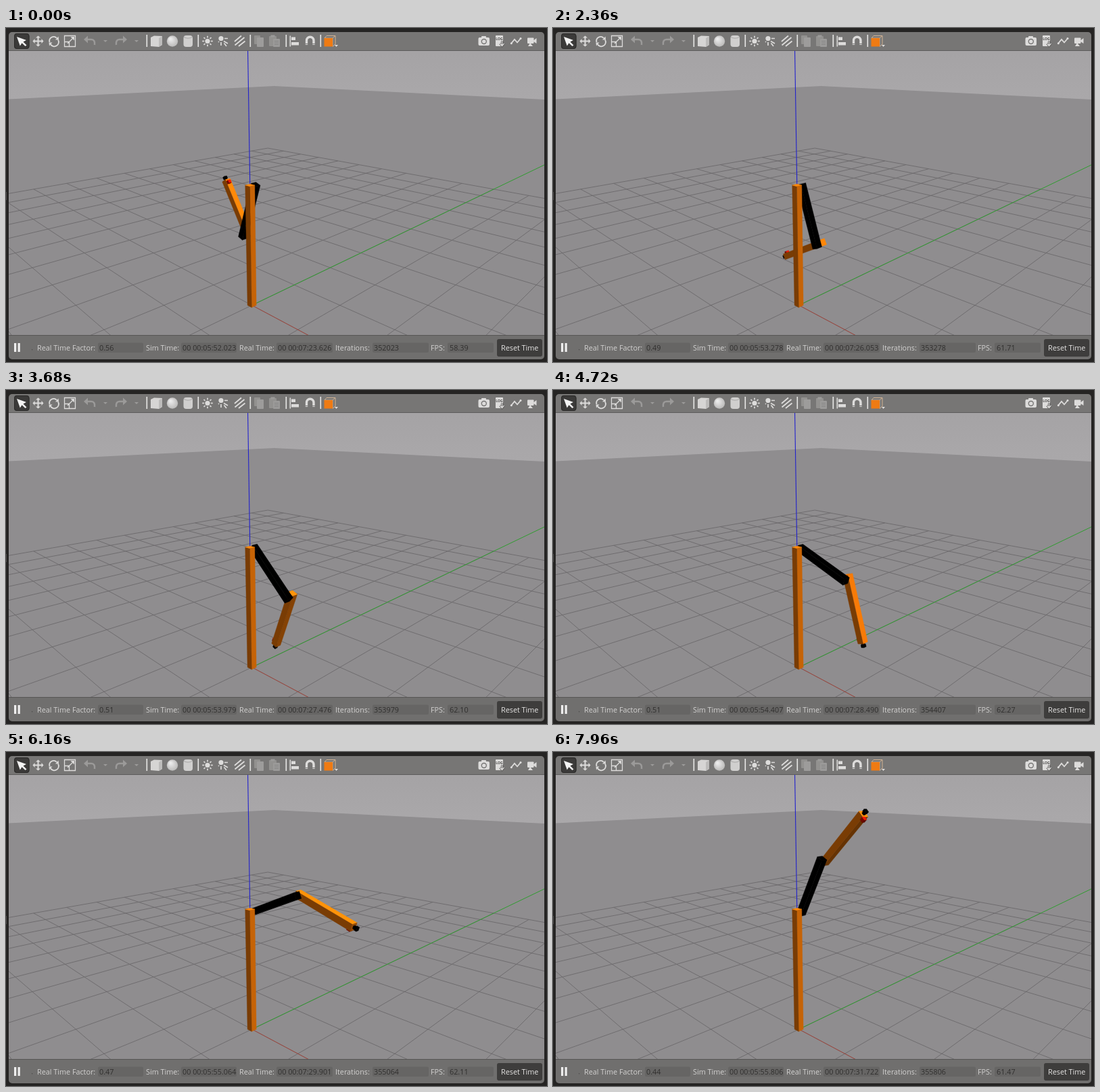
Animation of 800 by 495 pixels, one loop 8 s. Source, as an HTML page with a canvas:

```html
<!DOCTYPE html>
<html lang="en">
<head>
<meta charset="utf-8">
<title>Robot arm simulation</title>
<style>
html, body { margin: 0; width: 100%; height: 100%; overflow: hidden; background: #252423; }
canvas { display: block; width: 800px; height: 495px; }
</style>
</head>
<body>
<canvas id="stage" width="800" height="495"></canvas>
<script>
const LOOP = 8000;
const canvas = document.getElementById('stage');
const backdrop = document.createElement('canvas');
backdrop.width = 800;
backdrop.height = 495;
let g = backdrop.getContext('2d');

// ---- drawing helpers ----
function rect(x, y, w, h, color, r = 0) {
  g.fillStyle = color;
  g.beginPath();
  g.roundRect(x, y, w, h, r);
  g.fill();
}
function disc(x, y, r, color) {
  g.fillStyle = color;
  g.beginPath();
  g.arc(x, y, r, 0, 7);
  g.fill();
}
function poly(points, color) {
  g.fillStyle = color;
  g.beginPath();
  points.forEach(p => g.lineTo(p[0], p[1]));
  g.closePath();
  g.fill();
}
function stroke(path, color, width = 1) {
  g.strokeStyle = color;
  g.lineWidth = width;
  g.stroke(new Path2D(path));
}
function text(s, x, color) {
  g.font = '10.8px "Open Sans", sans-serif';
  g.fillStyle = color;
  g.fillText(s, x, 477.7);
}

// ---- camera: z up, looking along (-x, +y) and slightly down ----
const FOCAL = 686, DIST = 6.679, SIDE = 0.395, HEIGHT = 3.768, PITCH = 0.275643;
const EYE = [(SIDE + DIST) / Math.SQRT2, (SIDE - DIST) / Math.SQRT2, HEIGHT];
const COS = Math.cos(PITCH), SIN = Math.sin(PITCH);

function toView([x, y, z]) {
  const u = (y - x) / Math.SQRT2 + DIST, v = z - HEIGHT;
  return [(x + y) / Math.SQRT2 - SIDE, u * SIN + v * COS, u * COS - v * SIN];
}
const toScreen = ([r, up, depth]) => [400 + FOCAL * r / depth, 244.5 - FOCAL * up / depth];
const project = p => toScreen(toView(p));

function line3(a, b, color, width = 1) {
  let p = toView(a), q = toView(b);
  const near = 0.2;
  if (p[2] < near && q[2] < near) return;
  if (p[2] > q[2]) [p, q] = [q, p];
  if (p[2] < near) {
    const k = (near - p[2]) / (q[2] - p[2]);
    p = p.map((c, i) => c + (q[i] - c) * k);
  }
  const [x1, y1] = toScreen(p), [x2, y2] = toScreen(q);
  stroke(`M${x1} ${y1}L${x2} ${y2}`, color, width);
}

// ---- lit boxes, turned about the y axis ----
const LIGHT = [0.485, -0.097, 0.873];
const ORANGE = [255, 127, 8], BLACK = [0, 0, 0], RED = [235, 22, 5];
const dot = (a, b) => a[0] * b[0] + a[1] * b[1] + a[2] * b[2];

function makeFrame(origin, degrees) {
  const s = Math.sin(degrees * Math.PI / 180), c = Math.cos(degrees * Math.PI / 180);
  const turn = ([x, y, z]) => [x * c + z * s, y, z * c - x * s];
  return { turn, place: p => turn(p).map((v, i) => v + origin[i]) };
}
function facesEye(frame, normal, point) {
  const p = frame.place(point);
  return dot(frame.turn(normal), EYE.map((e, i) => e - p[i])) > 0;
}
function box(frame, center, half, color) {
  for (let axis = 0; axis < 3; axis++) for (const side of [-1, 1]) {
    const normal = [0, 0, 0];
    normal[axis] = side;
    const mid = center.map((c, i) => c + normal[i] * half[i]);
    if (!facesEye(frame, normal, mid)) continue;
    const a = (axis + 1) % 3, b = (axis + 2) % 3;
    const corners = [[-1, -1], [1, -1], [1, 1], [-1, 1]].map(([i, j]) => {
      const p = [...mid];
      p[a] += i * half[a];
      p[b] += j * half[b];
      return project(frame.place(p));
    });
    const lum = 0.4 + 0.78 * Math.max(0, dot(frame.turn(normal), LIGHT));
    const fill = `rgb(${color.map(c => Math.min(255, Math.round(c * lum)))})`;
    poly(corners, fill);
    g.strokeStyle = fill;
    g.lineWidth = 0.4;
    g.stroke();
  }
}

// ---- fixed scene ----
function drawGround() {
  g.save();
  g.beginPath();
  g.rect(4, 34, 792, 421);
  g.clip();
  const sky = g.createLinearGradient(0, 34, 0, 106);
  sky.addColorStop(0, '#a5a3a5');
  sky.addColorStop(1, '#aaa8aa');
  rect(4, 34, 792, 421, sky);
  poly([project([-50, -14, 0]), project([-50, 50, 0]), project([14, 50, 0]), [900, 500], [-100, 500]], '#8f8d8f');
  for (let i = -10; i <= 10; i++) {
    line3([i, -10, 0], [i, 10, 0], '#6b696b', 0.9);
    line3([-10, i, 0], [10, i, 0], '#6b696b', 0.9);
  }
  line3([0, 0, 0], [0, 50, 0], '#2f9c2f');
  line3([0, 0, 0], [4, 0, 0], '#a0483f');
  g.restore();
}

function drawToolbar() {
  const lite = '#dddcdb', dim = '#9b9a99', dark = '#4b4a49';
  rect(4, 6, 792, 40, '#777675', 5);
  rect(4, 33, 792, 1, '#5d5c5b');
  rect(12, 8, 22.5, 23, '#3b3a39', 4);
  stroke('M16 8.5H30Q34 8.5 34 12V27Q34 30.5 30 30.5H16Q12.5 30.5 12.5 27V12Q12.5 8.5 16 8.5Z', '#2b2a29');
  poly([[16, 13], [30, 18], [25.5, 20.5], [30.5, 25.5], [28.5, 27], [23.5, 22.3], [20.8, 26.5]], '#f4f4f4');

  stroke('M41 19.5H54M47.5 13V26', lite, 2);
  for (const [dx, dy] of [[1, 0], [-1, 0], [0, 1], [0, -1]]) {
    const x = 47.5 + dx * 5, y = 19.5 + dy * 5;
    poly([[x + dx * 3, y + dy * 3], [x + dy * 3.5, y + dx * 3.5], [x - dy * 3.5, y - dx * 3.5]], lite);
  }
  stroke('M64.5 21A6.3 6.3 0 0 1 75 14.8M77 17.5A6.3 6.3 0 0 1 66 24.2', lite, 1.8);
  poly([[73, 17.5], [78, 17.5], [77.5, 12.5]], lite);
  poly([[63.5, 21.5], [68.5, 21.5], [64, 26.5]], lite);
  stroke('M86.5 11.5H102.5V27.5H86.5ZM86.5 20.5H93.5V27.5M91 23L99 15', lite, 1.3);
  poly([[101, 13], [101, 18.5], [95.5, 13]], lite);

  for (const [x, s] of [[124, 1], [170, -1]]) {
    stroke(`M${x - 5 * s} 17H${x + 2 * s}Q${x + 8 * s} 17 ${x + 7 * s} 25`, dim, 2.5);
    poly([[x - 9 * s, 17], [x - 3 * s, 11.5], [x - 3 * s, 22.5]], dim);
    poly([[x + 20, 18], [x + 26, 18], [x + 23, 21]], dim);
  }
  for (const x of [207.5, 283.5, 360.5, 413.5, 464.5]) rect(x, 10, 1.6, 18, '#e9e8e7');

  poly([[214, 14], [219, 11.5], [231, 12], [231, 25], [226, 28], [214, 27]], '#d6d5d4');
  poly([[226, 15], [231, 12], [231, 25], [226, 28]], '#bdbcbb');
  const ball = g.createRadialGradient(243, 16, 1, 246, 19.5, 9);
  ball.addColorStop(0, '#ececec');
  ball.addColorStop(1, '#b8b7b6');
  disc(246, 19.5, 8.2, ball);
  rect(262.5, 11, 13.5, 17, '#d0cfce', 4);
  stroke('M263 13.5Q269 17 275.5 13.5', '#aaa9a8');

  disc(298, 19.5, 3.6, lite);
  for (let i = 0; i < 8; i++) {
    const c = Math.cos(i * Math.PI / 4), s = Math.sin(i * Math.PI / 4);
    stroke(`M${298 + 5 * c} ${19.5 + 5 * s}L${298 + 7.8 * c} ${19.5 + 7.8 * s}`, lite, 1.7);
  }
  disc(318, 15.5, 3.6, lite);
  stroke('M323 15.5H328M322 19.5L328 23M318 21V26M322.5 22.5L326 27M314 20L315 21', lite, 1.7);
  stroke('M338 20L348 11.5M338.5 25.5L352.5 14M344 27L353.5 19.5', lite, 1.8);

  rect(367, 11, 9, 13, '#92918f', 1);
  rect(371, 14, 10, 14, '#9d9c9b', 1);
  rect(389, 12, 11, 15, '#92918f', 1);
  rect(391.5, 10.5, 6, 3, dim);
  rect(395, 16, 10, 12, dim, 1);
  stroke('M397 19.5H403M397 22H403M397 24.5H403', '#858483', 0.8);

  rect(419.5, 11.5, 1.6, 16, lite);
  rect(422, 13.5, 6, 4.5, lite);
  rect(422, 21, 11, 4.5, lite);
  stroke('M444.5 25V18.5A5.2 5.2 0 0 1 455 18.5V25', lite, 3.4);
  rect(442.5, 23, 4, 1, '#777675');
  rect(453, 23, 4, 1, '#777675');

  stroke('M474 11.5H487V24L483 27.5M474 11.5L471 15M487 11.5L483 15M471 15H483V27', '#d2b394', 1);
  rect(470.5, 15, 12.5, 12.5, '#ef7b13');
  poly([[486, 25], [491, 25], [488.5, 28]], lite);

  rect(698.5, 14, 16.5, 12, lite, 2);
  rect(703, 12, 7, 4, lite, 1);
  disc(706.8, 20, 4.2, '#777675');
  disc(706.8, 20, 2.8, lite);

  rect(724, 11, 11, 16, lite, 1);
  g.font = 'bold 5px "Open Sans", sans-serif';
  g.fillStyle = dark;
  g.fillText('LOG', 724.3, 17.5);
  stroke('M733.5 19V25M730.5 23L733.5 26.5L736.5 23', dark, 3);
  stroke('M733.5 19V25M730.5 23L733.5 26.5L736.5 23', lite, 1.5);
  stroke('M747 23L752 17L756 21.5L761.5 15', lite, 1.8);
  disc(747.3, 22.8, 1.5, lite);
  disc(761, 15.5, 1.5, lite);
  rect(771, 14.5, 9.5, 8.5, lite, 1);
  poly([[780, 18.5], [784.5, 15], [784.5, 23], [780, 20]], lite);
  poly([[775, 22], [779, 27], [772, 27]], lite);
}

function drawStatusBar() {
  rect(4, 456, 792, 35, '#706f6e', [0, 0, 5, 5]);
  rect(4, 455, 792, 1, '#565554');
  rect(12, 467, 3.2, 13, '#eeeded');
  rect(17.6, 467, 3.2, 13, '#eeeded');
  rect(38, 476, 1.2, 1.2, '#4a4948');
  [['Real Time Factor:', 46], ['Sim Time:', 207], ['Real Time:', 345], ['Iterations:', 487], ['FPS:', 628]]
    .forEach(([label, x]) => text(label, x, '#d2d1d0'));
  [[136, 67], [259, 82], [400, 83], [542, 83], [653, 68]]
    .forEach(([x, w]) => rect(x, 466.5, w, 14.5, '#666564', 2));
  rect(726, 461, 67, 26, '#3e3d3c', 3);
  text('Reset Time', 732, '#e6e5e4');
}

// ---- motion ----
const POSE = {
  t: [0, 1320, 2360, 3680, 4720, 6160, 6720, 7560, 7960],
  upper: [199, 174, 160, 131.6, 108, 66, 52.5, 35, 27],
  lower: [-33, -98, -119.5, -160, -198, -254, -274, -303.5, -315]
};
const STATS = {
  n: [0, 7, 12, 19, 24, 31, 40],
  factor: [0.56, 0.49, 0.49, 0.51, 0.51, 0.47, 0.44],
  sim: [352.023, 352.754, 353.278, 353.979, 354.407, 355.064, 355.806],
  real: [443.626, 445.043, 446.053, 447.476, 448.490, 449.901, 451.722]
};
const FPS = [58.39, 59.7, 60.79, 61.71, 62.10, 62.27, 62.24, 62.11, 61.47];

function segment(keys, k) {
  let i = 0;
  while (i < keys.length - 2 && k >= keys[i + 1]) i++;
  return [i, (k - keys[i]) / (keys[i + 1] - keys[i])];
}
function linear(keys, values, k) {
  const [i, f] = segment(keys, k);
  return values[i] + (values[i + 1] - values[i]) * f;
}
function smooth(keys, values, k) {
  const [i, f] = segment(keys, k), last = keys.length - 1;
  const slope = j => {
    const a = Math.max(0, j - 1), b = Math.min(last, j + 1);
    return (values[b] - values[a]) / (keys[b] - keys[a]);
  };
  const h = keys[i + 1] - keys[i], e = 1 - f;
  return values[i] * (1 + 2 * f) * e * e + values[i + 1] * f * f * (3 - 2 * f)
    + h * f * e * (slope(i) * e - slope(i + 1) * f);
}

function drawArm(t) {
  const q1 = smooth(POSE.t, POSE.upper, t), q2 = smooth(POSE.t, POSE.lower, t);
  const upper = makeFrame([0, 0.1, 1.95], q1);
  const lower = makeFrame(upper.place([0, 0.1, 0.9]), q2);
  const sensor = () => {
    box(lower, [0, 0, 0.965], [0.018, 0.018, 0.015], BLACK);
    box(lower, [0, 0, 0.997], [0.025, 0.025, 0.018], BLACK);
  };
  const lens = () => box(lower, [0.05, 0, 0.9], [0.025, 0.025, 0.025], RED);
  const sensorInFront = facesEye(lower, [0, 0, 1], [0, 0, 0.95]);
  const lensInFront = facesEye(lower, [1, 0, 0], [0.05, 0, 0.9]);

  if (!sensorInFront) sensor();
  if (!lensInFront) lens();
  box(lower, [0, 0, 0.45], [0.05, 0.05, 0.5], ORANGE);
  if (lensInFront) lens();
  if (sensorInFront) sensor();
  box(upper, [0, 0, 0.45], [0.05, 0.05, 0.5], BLACK);

  const [x1, y1] = project([0, 0, 2]), [x2] = project([0, 0, HEIGHT + 0.148]);
  stroke(`M${x1} ${y1}L${x2} 34`, '#2222cc', 1.1);
  box(makeFrame([0, 0, 0], 0), [0, 0, 1], [0.05, 0.05, 1], ORANGE);
}

function clock(seconds) {
  const ms = Math.round(seconds * 1000);
  const pad = (v, n = 2) => String(v).padStart(n, '0');
  return `00 00:${pad(Math.floor(ms / 60000))}:${pad(Math.floor(ms / 1000) % 60)}.${pad(ms % 1000, 3)}`;
}
function drawStats(t) {
  const n = Math.min(40, Math.floor((t + 180) / 202.4));
  const sim = linear(STATS.n, STATS.sim, n);
  const factor = n >= 38 ? 0.44 : linear(STATS.n, STATS.factor, n);
  const ink = '#302f2e';
  text(factor.toFixed(2), 138, ink);
  text(clock(sim), 261, ink);
  text(clock(linear(STATS.n, STATS.real, n)), 402, ink);
  text(String(Math.round(sim * 1000)), 544, ink);
  text(FPS[Math.floor((t - 80) / 1005) + 1].toFixed(2), 656, ink);
}

rect(0, 0, 800, 495, '#252423');
drawToolbar();
drawGround();
drawStatusBar();
rect(0, 243, 1, 12, '#4a4948');
g = canvas.getContext('2d');

function render(now) {
  const t = Math.floor((now % LOOP) / 40) * 40;
  g.drawImage(backdrop, 0, 0);
  drawArm(t);
  drawStats(t);
}
const start = performance.now();
function tick() {
  render(performance.now() - start);
  requestAnimationFrame(tick);
}
tick();
</script>
</body>
</html>
```
